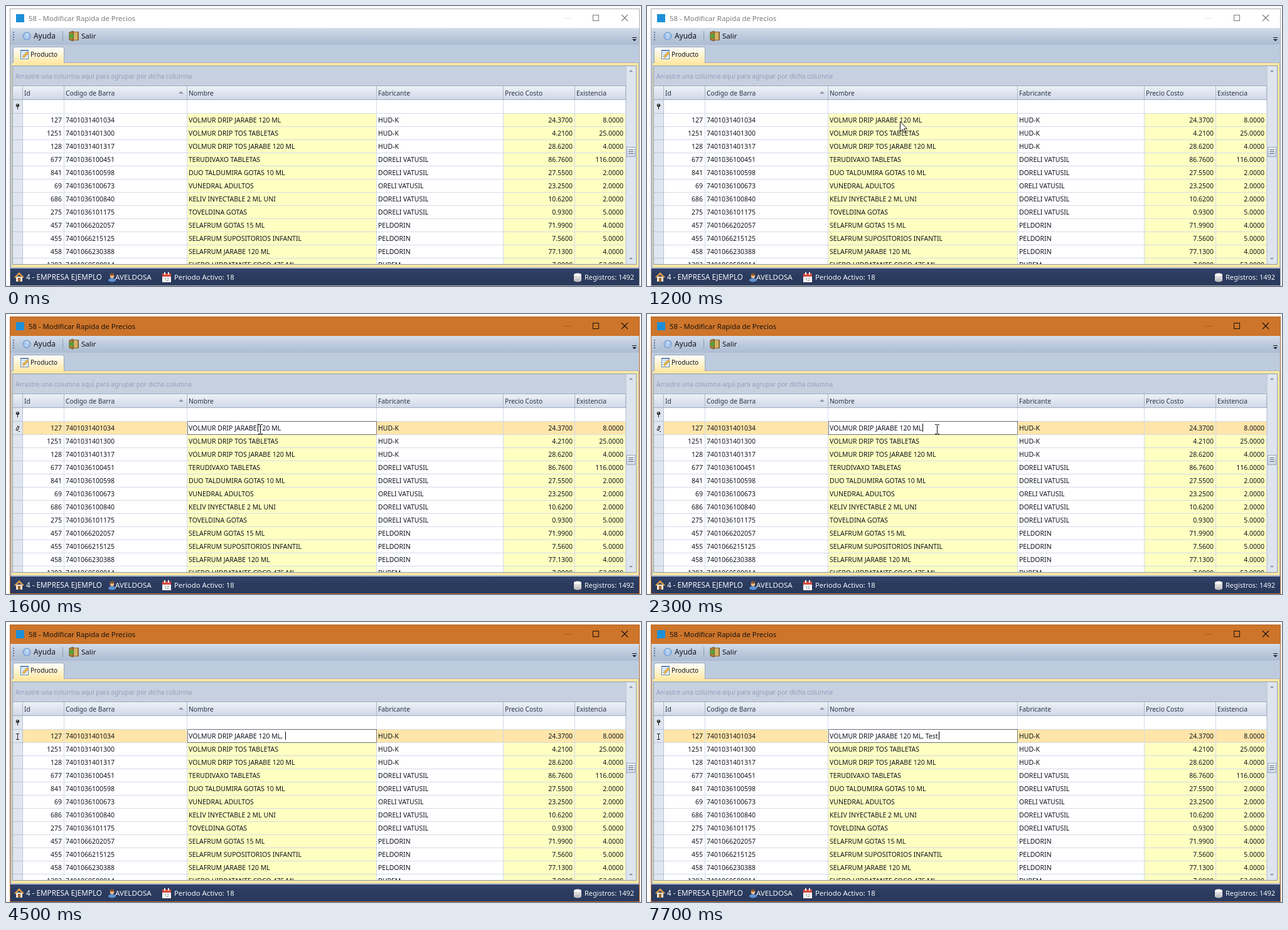
An HTML page with a canvas that plays this animation: 1012x447 px, repeating every 8000 ms.

```html
<!DOCTYPE html>
<html lang="es">
<head>
<meta charset="utf-8">
<title>Modificar Rapida de Precios</title>
<style>
html, body { margin: 0; width: 100%; height: 100%; overflow: hidden; background: #fff; }
canvas { display: block; }
</style>
</head>
<body>
<canvas id="stage" width="1012" height="447"></canvas>
<script>
const ctx = document.getElementById("stage").getContext("2d");
const LOOP = 8000;
const INK = "#10131c";
const LINE = "#d2daea";
const ROW_TOP = 172, ROW_H = 21;
const NAME_X = 291;
const COLUMNS = [
  { title: "Id", x: 27, end: 92, right: true },
  { title: "Codigo de Barra", x: 93, end: 288 },
  { title: "Nombre", x: 289, end: 590, fill: "#ffffc1" },
  { title: "Fabricante", x: 591, end: 792 },
  { title: "Precio Costo", x: 793, end: 906, right: true, fill: "#ffffc1" },
  { title: "Existencia", x: 907, end: 987, right: true, fill: "#ffffc1" }
];
const PRODUCTS = `127|7401031401034|VOLMUR DRIP JARABE 120 ML|HUD-K|24.3700|8.0000
1251|7401031401300|VOLMUR DRIP TOS TABLETAS|HUD-K|4.2100|25.0000
128|7401031401317|VOLMUR DRIP TOS JARABE 120 ML|HUD-K|28.6200|4.0000
677|7401036100451|TERUDIVAXO TABLETAS|DORELI VATUSIL|86.7600|116.0000
841|7401036100598|DUO TALDUMIRA GOTAS 10 ML|DORELI VATUSIL|27.5500|2.0000
69|7401036100673|VUNEDRAL ADULTOS|ORELI VATUSIL|23.2500|2.0000
686|7401036100840|KELIV INYECTABLE 2 ML UNI|DORELI VATUSIL|10.6200|2.0000
275|7401036101175|TOVELDINA GOTAS|DORELI VATUSIL|0.9300|5.0000
457|7401066202057|SELAFRUM GOTAS 15 ML|PELDORIN|71.9900|4.0000
455|7401066215125|SELAFRUM SUPOSITORIOS INFANTIL|PELDORIN|7.5600|5.0000
458|7401066230388|SELAFRUM JARABE 120 ML|PELDORIN|77.1300|4.0000
1283|7401069580014|SUERO HIDRATANTE COCO 475 ML|BUREM|7.9000|52.0000`
  .split("\n").map(line => line.split("|"));

// Time, text added to the name, caret hidden
const EDITS = [
  [1600, ""], [2300, ""], [4200, ""], [4400, ","], [4500, ", "],
  [5100, ", t"], [5200, ", te"], [5500, ", tes"], [5600, ", test"], [6000, ", test", true],
  [6200, ", tes"], [6400, ", te"], [6500, ", t"], [6700, ", "],
  [7200, ", T"], [7400, ", Te"], [7600, ", Tes"], [7700, ", Test"]
];

function rect(x, y, w, h, color) {
  ctx.fillStyle = color;
  ctx.fillRect(x, y, w, h);
}

function shade(y, h, ...colors) {
  const g = ctx.createLinearGradient(0, y, 0, y + h);
  colors.forEach((c, i) => g.addColorStop(i / (colors.length - 1), c));
  return g;
}

function frame(x, y, w, h, color) {
  ctx.strokeStyle = color;
  ctx.lineWidth = 1;
  ctx.strokeRect(x + 0.5, y + 0.5, w - 1, h - 1);
}

function dottedFrame(x, y, w, h, color) {
  ctx.setLineDash([1, 1]);
  ctx.lineDashOffset = 0.5; // keeps the dots on whole pixels
  frame(x, y, w, h, color);
  ctx.setLineDash([]);
}

function poly(points, fill, stroke, width = 1) {
  ctx.beginPath();
  points.forEach(([x, y]) => ctx.lineTo(x, y));
  ctx.closePath();
  if (fill) { ctx.fillStyle = fill; ctx.fill(); }
  if (stroke) { ctx.strokeStyle = stroke; ctx.lineWidth = width; ctx.stroke(); }
}

function segment(x1, y1, x2, y2, color, width = 1) {
  ctx.beginPath();
  ctx.moveTo(x1, y1);
  ctx.lineTo(x2, y2);
  ctx.strokeStyle = color;
  ctx.lineWidth = width;
  ctx.stroke();
}

function ellipse(x, y, rx, ry, color) {
  ctx.beginPath();
  ctx.ellipse(x, y, rx, ry, 0, 0, Math.PI * 2);
  ctx.fillStyle = color;
  ctx.fill();
}

function setFont(size) {
  ctx.font = `${size}px "Noto Sans", "Open Sans", sans-serif`;
}

function label(text, x, y, size, color = INK, align = "left") {
  setFont(size);
  ctx.textAlign = align;
  ctx.fillStyle = color;
  ctx.fillText(text, x, y);
}

function drawTitleBar(active) {
  rect(6, 4, 1004, 443, active ? "#b8682a" : "#a9acb0");
  rect(7, 5, 1002, 30, active ? "#cd752a" : "#ffffff");
  rect(16, 13, 13, 13, "#1d8fd8");
  const ink = active ? "#17120e" : "#7b7b7b";
  label("58 - Modificar Rapida de Precios", 36, 24, 11.35, ink);
  rect(890, 19, 10, 1, active ? "#a95f22" : "#e6e6e6");
  frame(935, 14, 10, 10, ink);
  segment(981, 14, 991, 24, ink, 1.1);
  segment(991, 14, 981, 24, ink, 1.1);
}

function drawToolbar() {
  rect(7, 35, 1002, 27, shade(35, 27, "#d3ddea", "#bccadd", "#acbcd2"));
  rect(7, 62, 1002, 358, "#bdcbde");
  rect(7, 61, 1002, 1, "#b0bed3");
  for (let y = 41; y < 56; y += 4) rect(11, y, 2, 2, "#64789a");

  ellipse(33, 48, 6.5, 6.5, "#6f95c8");
  ellipse(33, 48, 5.4, 5.4, "#a3c5ee");
  label("?", 33, 52, 10.5, "#ffffff", "center");
  label("Ayuda", 44, 52, 11.9);
  rect(90, 40, 1, 16, "#8b9db9");

  rect(107, 41, 9, 14, "#8d6a32");
  rect(108, 42, 6, 12, "#d6b267");
  poly([[101, 42], [107, 40], [107, 56], [101, 54]], "#af7f34", "#705226");
  poly([[100, 46], [104, 46], [104, 43], [109, 48], [104, 53], [104, 50], [100, 50]], "#52a33e");
  label("Salir", 120, 52, 11.6);

  rect(998, 50, 7, 1, INK);
  poly([[998, 53], [1005, 53], [1001.5, 56]], INK);
}

function drawTab() {
  rect(8, 90, 1001, 328, "#a3b0c6");
  rect(9, 91, 999, 326, "#ffe8a2");
  ctx.beginPath();
  ctx.roundRect(11.5, 65.5, 81, 32, 3);
  ctx.fillStyle = shade(65, 27, "#ffffff", "#fff4d2", "#ffe8a2");
  ctx.fill();
  ctx.strokeStyle = "#97a5bb";
  ctx.stroke();
  rect(10, 91, 84, 7, "#ffe8a2");

  rect(23, 70, 13, 15, "#5b83b8");
  rect(24, 72, 11, 12, "#f2f8ff");
  for (let y = 74; y < 83; y += 3) rect(25, y, 8, 1, "#a8bfde");
  segment(27, 82, 35, 74, "#b47918", 3.4);
  segment(27, 82, 35, 74, "#f6c54c", 2);
  label("Producto", 39, 81, 10.1);
}

function drawScrollBar() {
  rect(988, 96, 16, 316, "#dfe5ee");
  rect(988, 96, 1, 316, "#c5cfdd");
  poly([[993, 105], [999, 105], [996, 102]], "#8391a8");
  poly([[993, 402], [999, 402], [996, 405]], "#8391a8");
  rect(989, 225, 14, 16, shade(225, 16, "#f5f8fc", "#cdd7e5"));
  frame(989, 225, 14, 16, "#94a3bb");
  for (let y = 229; y < 238; y += 3) rect(992, y, 8, 1, "#58677f");
}

function drawGridHeader() {
  rect(10, 95, 995, 318, "#8c9bb3");
  rect(11, 96, 993, 316, "#ffffff");
  rect(11, 96, 977, 31, "#c6d0df");
  label("Arrastre una columna aqui para agrupar por dicha columna", 15, 116, 10.05, "#8fa0bd");
  rect(11, 127, 977, 1, "#9eacc2");
  rect(11, 128, 977, 21, shade(128, 21, "#edf1f7", "#dfe5ef", "#d0d9e6"));
  rect(11, 149, 977, 1, "#9eacc2");
  rect(26, 128, 1, 21, "#a9b6ca");
  for (const { title, x, end } of COLUMNS) {
    rect(end, 128, 1, 21, "#a9b6ca");
    label(title, x + 2, 143, 10.3, "#29334a");
  }
  poly([[275, 140], [283, 140], [279, 136]], "#8d97a8");
  rect(11, 150, 15, 262, "#e0e6f0");
  rect(26, 150, 1, 262, "#b7c3d6");
  ellipse(18.5, 158.5, 2.7, 2.5, "#151515");
  ellipse(18.2, 158, 0.9, 0.9, "#ffffff");
  rect(18, 160, 1, 5, "#151515");
}

function drawRow(values, index, selected, suffix) {
  const y = ROW_TOP + index * ROW_H;
  rect(11, y - 1, 16, 1, "#b7c3d6");
  COLUMNS.forEach((col, i) => {
    const width = col.end - col.x;
    const fill = selected ? "#ffe5a9" : col.fill;
    if (fill) rect(col.x, y, width, ROW_H - 1, fill);
    if (selected && i === 2) {
      rect(col.x, y, width + 1, ROW_H - 1, "#ffffff");
      dottedFrame(col.x, y - 1, width + 1, ROW_H + 1, "#000000");
    }
    const x = col.right ? col.end - 3 : col.x + 2;
    const text = i === 2 ? values[i] + suffix : values[i];
    label(text, x, y + 14, 10.5, INK, col.right ? "right" : "left");
  });
}

function drawGrid(selected, suffix) {
  drawGridHeader();
  ctx.save();
  ctx.beginPath();
  ctx.rect(11, 150, 977, 262);
  ctx.clip();
  PRODUCTS.forEach((_, i) => rect(27, ROW_TOP - 1 + i * ROW_H, 961, 1, LINE));
  COLUMNS.forEach(({ end }) => rect(end, 150, 1, 262, LINE));
  PRODUCTS.forEach((values, i) => drawRow(values, i, selected && i === 0, i ? "" : suffix));
  ctx.restore();
  drawScrollBar();
}

function drawStatusBar() {
  rect(7, 419, 1002, 27, shade(419, 27, "#31426a", "#2a3a5d", "#2a3a5d"));
  const white = "#f7f9fc";

  rect(16, 432, 10, 8, "#eee4cf");
  poly([[13, 433], [21, 425], [29, 433], [27, 434], [21, 429], [15, 434]], "#d99a4a");
  rect(19, 434, 4, 6, "#9b6530");
  label("4 - EMPRESA EJEMPLO", 32, 437, 11.7, white);

  ellipse(169, 437.5, 6, 3, "#5b93d6");
  ellipse(169, 431, 3.2, 3.8, "#efbd87");
  ellipse(169, 428.5, 3.3, 2, "#8a542a");
  label("AVELDOSA", 174, 437, 11.6, white);

  rect(249, 427, 14, 14, "#f6f6f6");
  rect(249, 427, 14, 5, "#d94a40");
  rect(252, 425, 2, 4, "#ffffff");
  rect(258, 425, 2, 4, "#ffffff");
  label("12", 256, 439, 6.5, "#7b7b7b", "center");
  label("Periodo Activo: 18", 268, 437, 11.35, white);

  rect(905, 429, 12, 9, "#d9d9d9");
  ellipse(911, 438, 6, 2.4, "#c3c3c3");
  ellipse(911, 429, 6, 2.6, "#fafafa");
  label("Registros: 1492", 922, 437, 11, white);
}

function drawRowMark(typing) {
  if (typing) {
    rect(18, 178, 1, 10, "#222222");
    rect(16, 178, 5, 1, "#222222");
    rect(16, 187, 5, 1, "#222222");
  } else {
    segment(17, 186, 20, 179, "#222222", 3.4);
    segment(17.3, 185, 19.5, 180, "#ffffff", 1.3);
    rect(20, 187, 2, 1, "#222222");
  }
}

function drawArrow(x, y) {
  ctx.save();
  ctx.translate(x + 0.5, y + 0.5);
  poly([[0, 0], [0, 16], [3.7, 12.5], [6.2, 18], [8.5, 17], [6, 11.5], [11, 11.5]], "#ffffff", "#111111");
  ctx.restore();
}

function drawBeam(x, y) {
  rect(x, y - 7, 1, 14, "#111111");
  for (const edge of [y - 8, y + 7]) {
    rect(x - 3, edge, 3, 1, "#111111");
    rect(x + 1, edge, 3, 1, "#111111");
  }
}

function steps(t, start, count, origin = 0) {
  const n = Math.floor((t - start) / 100) + origin;
  return Math.max(0, Math.min(1, n / (count - 1 + origin)));
}

function drawPointer(t) {
  if (t < 300 || t >= 4200) return;
  if (t < 1600) {
    const u = steps(t, 300, 5);
    const v = steps(t, 900, 4, 1);
    const x = 992 - 536 * (1 - (1 - u) ** 1.5) - 53 * v;
    const y = 38 + 161 * (1 - (1 - u) ** 2) - 15 * v;
    drawArrow(Math.round(x), Math.round(y));
  } else {
    const u = steps(t, 1600, 7);
    const v = steps(t, 2600, 3, 1);
    const x = 405 + 57 * u * u * (3 - 2 * u) + 22 * v;
    drawBeam(Math.round(x), Math.round(184 - 7 * v));
  }
}

function drawCaret(t, edit) {
  const [since, suffix, hidden] = edit;
  if (hidden || Math.floor((t - since) / 500) % 2) return;
  const name = PRODUCTS[0][2];
  const before = t < 2300 ? name.slice(0, name.indexOf(" 120")) : name + suffix;
  setFont(10.5);
  rect(Math.round(NAME_X + ctx.measureText(before).width) + 1, 175, 1, 13, "#000000");
}

function draw(t) {
  const edit = EDITS.findLast(([time]) => time <= t);
  rect(0, 0, 1012, 447, "#ffffff");
  drawTitleBar(t >= 1500);
  drawToolbar();
  drawTab();
  drawGrid(Boolean(edit), edit ? edit[1] : "");
  drawStatusBar();
  if (edit) {
    drawRowMark(t >= 4400);
    drawCaret(t, edit);
  }
  drawPointer(t);
}

const began = performance.now();
function tick() {
  draw((performance.now() - began) % LOOP);
  requestAnimationFrame(tick);
}
tick();
</script>
</body>
</html>
```
